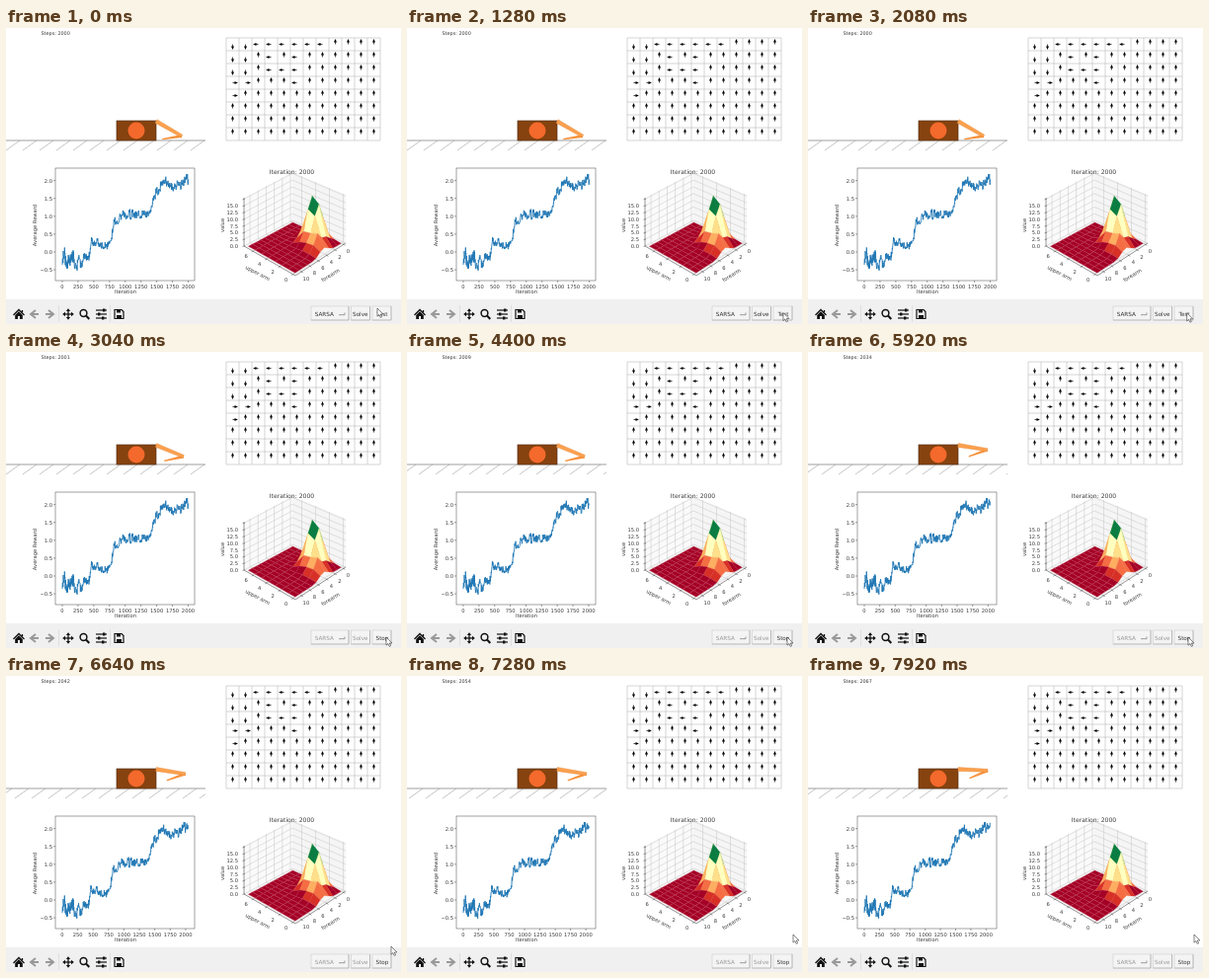
Write an HTML page that moves like this. It is 400x300 px and loops after 8 s.

```html
<!DOCTYPE html>
<html lang="en">
<head>
<meta charset="utf-8">
<title>Crawler learning</title>
<style>
html, body { margin: 0; width: 100%; height: 100%; overflow: hidden; background: #fff; }
svg { display: block; width: 100vw; height: 100vh; }
text { font-family: "DejaVu Sans", sans-serif; font-size: 5.2px; fill: #3a3a3a; text-rendering: geometricPrecision; }
</style>
</head>
<body>
<svg id="stage" viewBox="0 0 400 300"></svg>
<script>
const stage = document.getElementById('stage');
const $ = id => document.getElementById(id);
const line = (x1, y1, x2, y2, c = '#444', w = .5) =>
  `<path d="M${x1} ${y1}L${x2} ${y2}" stroke="${c}" stroke-width="${w}"/>`;
const poly = (pts, fill, extra = '') => `<polygon points="${pts.join(' ')}" fill="${fill}" ${extra}/>`;
const path = (pts, c, w = .5) =>
  `<polyline points="${pts.join(' ')}" fill="none" stroke="${c}" stroke-width="${w}"/>`;
const rect = (x, y, w, h, fill, extra = '') =>
  `<rect x="${x}" y="${y}" width="${w}" height="${h}" fill="${fill}" ${extra}/>`;
const text = (x, y, s, extra = '', anchor = 'middle') =>
  `<text x="${x}" y="${y}" text-anchor="${anchor}" ${extra}>${s}</text>`;
const turned = (x, y, s, deg) => text(0, 0, s, `transform="translate(${x} ${y}) rotate(${deg})"`);
const range = (n, f) => Array.from({ length: n }, (_, i) => f(i)).join('');

// Linear interpolation through [time, ...values] keys
function track(keys, t) {
  let i = 0;
  while (i < keys.length - 2 && t >= keys[i + 1][0]) i++;
  const [a, b] = [keys[i], keys[i + 1]];
  const k = Math.min(1, Math.max(0, (t - a[0]) / (b[0] - a[0])));
  return a.slice(1).map((v, j) => v + (b[j + 1] - v) * k);
}

function crawler() {
  return text(35.5, 7.2, '', 'id="steps" style="font-size:4.9px"', 'start') +
    line(0, 114, 202, 114, '#777', .7) +
    '<clipPath id="soil"><rect y="114" width="202" height="11"/></clipPath>' +
    '<g clip-path="url(#soil)"><g id="ground">' +
    range(18, i => line(i * 17 - 17, 124, i * 17 - 3, 114, '#888', .5)) + '</g></g>' +
    rect(112, 94, 40, 20, '#86420f', 'stroke="#5a3214" stroke-width=".7"') +
    '<circle cx="132" cy="104" r="8.5" fill="#f4692c"/>' +
    '<polygon id="hand" fill="#f7923c"/><polygon id="arm" fill="#fba04e" stroke="#e08a3c" stroke-width=".4"/>';
}

function policy() {
  const rows = ['DDLLLLLL', 'DDULUL', 'DDULLL', 'RRUUUL', 'R', '', '', ''];
  const turn = { U: 0, R: 90, D: 180, L: 270 };
  const arrow = '<path d="M0 0V-3" stroke="#000" stroke-width=".7"/><path d="M0-5.4L1.5-2H-1.5Z"/>';
  return range(13, i => line(223 + 13 * i, 10, 223 + 13 * i, 114, '#aaa')) +
    range(9, i => line(223, 10 + 13 * i, 379, 10 + 13 * i, '#aaa')) +
    rows.map((row, r) => range(12, c =>
      `<g transform="translate(${229.5 + 13 * c} ${16.5 + 13 * r}) rotate(${turn[row[c] || 'U']})">${arrow}</g>`)).join('');
}

const rewardY = v => 227 - v * 36.2;
function chart() {
  return '<path id="curve" fill="none" stroke="#1f77b4" stroke-width=".9" stroke-linejoin="round"/>' +
    rect(50, 142, 141, 114, 'none', 'stroke="#444" stroke-width=".5"') +
    range(6, i => {
      const v = i / 2 - .5, y = rewardY(v);
      return line(48, y, 50, y) + text(47, y + 1.9, v.toFixed(1).replace('-', '−'), '', 'end');
    }) +
    range(9, i => `<g class="tick">${line(0, 256, 0, 258)}${text(0, 263.6, i * 250)}</g>`) +
    text(121, 269.4, 'Iteration') + turned(31, 200, 'Average Reward', -90);
}

const trend = [[0, 0], [60, -.25], [150, 0], [200, -.4], [270, -.3], [420, -.15], [460, .25], [740, .15],
  [830, .8], [950, 1], [1370, 1.05], [1500, 1.75], [1650, 1.95], [1800, 1.8], [2080, 2.15]];
const noise = i => { const s = Math.sin(i * 12.9898) * 43758.5453; return (s - Math.floor(s)) * 2 - 1; };
const reward = n => track(trend, n)[0] +
  (.16 + .25 * Math.exp(-n / 150)) * (.6 * noise(n) + .6 * noise(Math.floor(n / 24) + .5));

// Floor corners are joined bilinearly: right, back, front, left
const floor = [[344, 218], [290, 195], [293, 251], [241, 221]], lift = 2.72;
function project(u, f, z) {
  const a = (u + .35) / 7.7, b = (f + .5) / 12;
  const [R, B, F, L] = floor;
  return [0, 1].map(i => +((R[i] * (1 - a) + B[i] * a) * (1 - b) + (F[i] * (1 - a) + L[i] * a) * b -
    (i ? z * lift : 0)).toFixed(1));
}

const hill = (u, f, h, u0, f0, su, sf) => h * Math.exp(-(((u - u0) / su) ** 2) - ((f - f0) / sf) ** 2);
const value = (u, f) => hill(u, f, 18, 2.6, 2.1, 1.2, 1.5) +
  hill(u, f, 4.5, 1.2, 4.2, 1.7, 1.3) * (1 + .4 * noise(u * 12 + f));
const ramp = ['#a50026', '#d73027', '#f46d43', '#fdae61', '#fee08b', '#ffffbf', '#d9ef8b', '#66bd63', '#1a9850', '#0b7d42'];

function surface() {
  const P = project, top = 18, u0 = -.35, u1 = 7.35, f0 = -.5, f1 = 11.5, grey = '#c4c4c4';
  let s = poly([P(u0, f0, 0), P(u1, f0, 0), P(u1, f1, 0), P(u0, f1, 0)], '#f6f6f6') +
    poly([P(u1, f1, 0), P(u1, f0, 0), P(u1, f0, top), P(u1, f1, top)], '#fafafa') +
    poly([P(u0, f0, 0), P(u1, f0, 0), P(u1, f0, top), P(u0, f0, top)], '#f5f5f5');
  for (let f = 0; f < 11; f += 2) {
    const [x, y] = P(u0, f, 0);
    s += path([P(u0, f, 0), P(u1, f, 0), P(u1, f, top)], grey) +
      line(x - 1, y - .5, x + 1.5, y + .9) + text(x + 4.5, y + 9, f);
  }
  for (let u = 0; u < 7; u += 2) {
    const [x, y] = P(u, f1, 0);
    s += path([P(u, f1, 0), P(u, f0, 0), P(u, f0, top)], grey) +
      line(x + 1, y - .5, x - 1.5, y + .9) + text(x - 7, y + 7, u);
  }
  for (let z = 0; z < top; z += 2.5) {
    const [x, y] = P(u1, f1, z);
    s += path([P(u1, f1, z), P(u1, f0, z), P(u0, f0, z)], grey) + line(x - 1.5, y + .5, x + 1, y - .3);
    if (z < 16) s += text(235, y + 2, z.toFixed(1), '', 'end');
  }
  s += path([P(u1, f1, top), P(u1, f1, 0), P(u0, f1, 0), P(u0, f0, 0)], '#555', .6);
  // Facets from back to front
  for (let u = 6; u >= 0; u--) for (let f = 0; f < 11; f++) {
    const nodes = [[u, f], [u + 1, f], [u + 1, f + 1], [u, f + 1]];
    const mean = nodes.reduce((sum, n) => sum + value(...n), 0) / 4;
    const c = ramp[Math.min(9, Math.floor(mean / 1.45))];
    s += poly(nodes.map(n => P(...n, value(...n))), c, `stroke="${mean < 1 ? '#c04058' : c}" stroke-width=".3"`);
  }
  return s + text(289.5, 148.3, 'Iteration: 2000', 'style="font-size:6.1px"') +
    turned(221, 200, 'value', -90) + turned(254, 250, 'upper arm', 28) + turned(329.5, 252, 'forearm', -32);
}

function toolbar() {
  const button = (x, w, id, label, tx) =>
    rect(x, 282, w, 14, '#f4f4f4', `id="${id}Box" stroke="#ccc" stroke-width=".6"`) +
    path([[x, 296], [x + w, 296], [x + w, 282]], '#999') +
    text(tx, 292.2, label, `id="${id}" style="font-size:5.7px"`);
  const arrow = (x, d) =>
    `<path d="M${x + 4 * d} 290H${x - 3 * d}M${x + d} 286L${x - 4 * d} 290L${x + d} 294" fill="none" stroke="#999" stroke-width="2"/>`;
  const slider = (y, x) => line(91, y, 102, y, '#111', 1.2) + rect(x, y - 1.5, 2.4, 3, '#111');
  return rect(0, 275, 400, 25, '#f0f0f0') +
    '<path d="M7.5 291L13 285.5L18.5 291M16.5 286V288" fill="none" stroke="#111" stroke-width="1.3"/>' +
    '<path d="M9.2 291L13 287.2L16.8 291V295H14V292H12V295H9.2Z" fill="#111"/>' +
    arrow(29, 1) + arrow(44, -1) + line(53.5, 281, 53.5, 298, '#ccc') +
    line(59, 290, 67, 290, '#111', 1.3) + line(63, 286, 63, 294, '#111', 1.3) +
    range(4, i => `<path d="M-2.2 -3L0 -5.8L2.2 -3Z" fill="#111" transform="translate(63 290) rotate(${i * 90})"/>`) +
    '<circle cx="78.5" cy="289" r="3.4" fill="none" stroke="#111" stroke-width="1.5"/>' + line(81, 291.5, 84.3, 295, '#111', 2) +
    slider(286, 98) + slider(290, 93) + slider(294, 97) + line(105.5, 281, 105.5, 298, '#ccc') +
    '<path d="M110 285.5H117L119 287.5V294.5H110Z" fill="none" stroke="#111" stroke-width="1.2"/>' +
    rect(112, 285.5, 4, 3, '#111') + rect(112, 291, 5, 3.5, '#111') +
    button(309, 38, 'method', 'SARSA', 322.3) + path([[337, 290.7], [343, 290.7], [343, 288.5]], '#777', .7) +
    button(349.5, 19, 'solve', 'Solve', 358.8) + button(371, 19, 'run', 'Test', 381);
}

stage.innerHTML = crawler() + policy() + chart() + surface() + toolbar() +
  '<path id="cursor" d="M0 0V8.2L1.9 6.5L3.2 9.4L4.6 8.8L3.3 6H5.9Z" fill="#fff" stroke="#333" stroke-width=".6"/>';

const cursorKeys = [[80, 376, 284], [1280, 381, 288.5], [2480, 385, 289], [6160, 385, 289], [6640, 390, 274], [7040, 391, 262]];
const stepKeys = [[2960, 2000], [3040, 2001], [4400, 2009], [5360, 2029], [6640, 2042], [7920, 2067]];

// The gait repeats every 8 steps; the ground slides while the arm comes down
function drawPose(k) {
  const rad = Math.PI / 180, beat = k % 8;
  const slope = 2 + 28 * Math.cos(beat * Math.PI / 8) ** 4, bend = 24 + slope / 2;
  const ray = (x, y, deg, r) => [x + r * Math.cos(deg * rad), y + r * Math.sin(deg * rad)];
  const bar = (a, b, deg, wa, wb) =>
    [ray(...a, deg - 90, wa), ray(...b, deg - 90, wb), ray(...b, deg + 90, wb), ray(...a, deg + 90, wa)].join(' ');
  const shoulder = [152, 94.5], elbow = ray(...shoulder, slope, 30), fold = slope + 180 - bend;
  $('arm').setAttribute('points', bar(shoulder, elbow, slope, 2, 1.5));
  $('hand').setAttribute('points', bar(elbow, ray(...elbow, fold, 20), fold, 1.5, .6));
  const moved = 5 * Math.floor(k / 8) + Math.max(0, beat - 4);
  $('ground').setAttribute('transform', `translate(${-(moved % 17)} 0)`);
}

function drawCurve(n) {
  const x = v => 57 + v * 127.5 / n;
  let d = '';
  for (let v = 0; v <= n; v += 4) d += `${v ? 'L' : 'M'}${x(v).toFixed(2)} ${rewardY(reward(v)).toFixed(2)}`;
  $('curve').setAttribute('d', d);
  document.querySelectorAll('.tick').forEach((g, i) => g.setAttribute('transform', `translate(${x(i * 250)} 0)`));
}

let shown = 0;
function frame(now) {
  const t = Math.floor(now % 8000 / 80) * 80;
  const n = Math.floor(track(stepKeys, t)[0] + 1e-6);
  if (n !== shown) {
    shown = n;
    $('steps').textContent = 'Steps: ' + n;
    drawPose(n - 2000);
    drawCurve(n);
  }
  const running = t >= 3040;
  $('run').textContent = running ? 'Stop' : 'Test';
  $('method').style.fill = $('solve').style.fill = running ? '#999' : '#333';
  $('runBox').setAttribute('fill', t >= 2720 && !running ? '#dcdcdc' : '#f4f4f4');
  $('cursor').setAttribute('transform', `translate(${track(cursorKeys, t)})`);
  requestAnimationFrame(frame);
}
frame(0);
</script>
</body>
</html>
```
